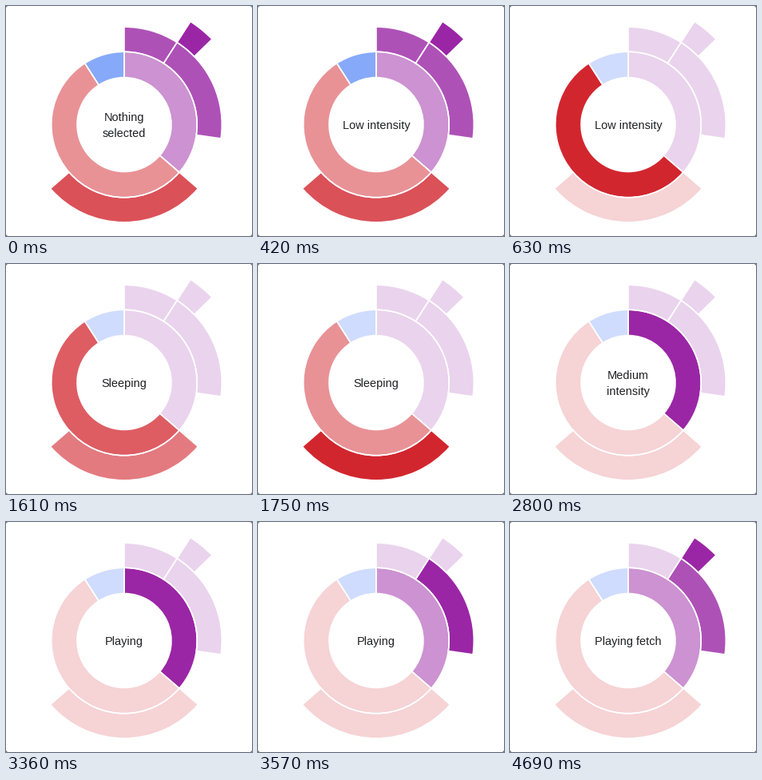
Write a matplotlib script that moves like this. It is 308x288 px and loops after 5740 ms.

```python
import numpy as np
import matplotlib.pyplot as plt
from matplotlib.animation import FuncAnimation
from matplotlib.patches import FancyBboxPatch, Wedge

W, H, DPI = 308, 288, 100
STEP, FRAMES = 70, 82
PX = 72 / DPI
CX, CY = 148, 148.5
RADII = (59.0, 91.2, 122.3, 153.4)
UNIT = 360 / 11
FADE = 200

PURPLE, RED, BLUE = "#9a26a5", "#d2262e", "#0f54f5"
LEVEL_ALPHA = (0.5, 0.8, 1.0)
DIM = 0.2

# name: (level, start, end, colour, ancestors), angles in elevenths of a turn
SEGMENTS = {
    "medium": (0, 0, 4, PURPLE, ()),
    "low": (0, 4, 10, RED, ()),
    "high": (0, 10, 11, BLUE, ()),
    "walking": (1, 0, 1, PURPLE, ("medium",)),
    "playing": (1, 1, 3, PURPLE, ("medium",)),
    "sleeping": (1, 4, 7, RED, ("low",)),
    "fetch": (2, 1, 1.4, PURPLE, ("medium", "playing")),
}

# (time in ms, selected segment, label)
EVENTS = [
    (0, None, "Nothing\nselected"),
    (420, "low", "Low intensity"),
    (1550, "sleeping", "Sleeping"),
    (2590, "medium", "Medium\nintensity"),
    (3360, "playing", "Playing"),
    (4480, "fetch", "Playing fetch"),
]


def ease(t):
    """CSS 'ease' timing curve."""
    t = min(max(t, 0), 1)
    s = np.linspace(0, 1, 201)
    a, b, c = 3 * s * (1 - s) ** 2, 3 * s ** 2 * (1 - s), s ** 3
    return np.interp(t, 0.25 * a + 0.25 * b + c, 0.1 * a + b + c)


def opacity(name, selected):
    level, *_ = SEGMENTS[name]
    if name == selected:
        return 1.0
    if selected is None or name in SEGMENTS[selected][4]:
        return LEVEL_ALPHA[level]
    return DIM


fig = plt.figure(figsize=(W / DPI, H / DPI), dpi=DPI, facecolor="#6a6a6a")
ax = fig.add_axes([0, 0, 1, 1])
ax.set(xlim=(0, W), ylim=(H, 0))
ax.axis("off")
ax.add_patch(FancyBboxPatch((0, 0), W, H, boxstyle="round,pad=0,rounding_size=3",
                            fc="white", ec="none"))

wedges = {}
for name, (level, a, b, colour, _) in SEGMENTS.items():
    inner, outer = RADII[level:level + 2]
    span = a * UNIT - 90, b * UNIT - 90
    shape = dict(width=outer - inner, joinstyle="miter")
    wedges[name] = ax.add_patch(
        Wedge((CX, CY), outer, *span, fc=colour, ec="none", **shape))
    ax.add_patch(Wedge((CX, CY), outer, *span, fc="none", ec="white",
                       lw=1.6 * PX, zorder=2, **shape))

lines = [ax.text(CX, 0, "", ha="center", va="baseline", color="#202124",
                 family="Liberation Sans", size=14.5 * PX, zorder=3)
         for _ in range(2)]


def update(frame):
    now = frame * STEP
    i = max(k for k, event in enumerate(EVENTS) if event[0] <= now)
    start, selected, label = EVENTS[i]
    previous = EVENTS[max(i - 1, 0)][1]
    p = ease((now - start) / FADE)
    for name, wedge in wedges.items():
        old, new = opacity(name, previous), opacity(name, selected)
        wedge.set_alpha(old + (new - old) * p)

    rows = label.split("\n")
    for k, line in enumerate(lines):
        line.set_text(rows[k] if k < len(rows) else "")
        line.set_y(154 + 20 * (k - (len(rows) - 1) / 2))
    return [*wedges.values(), *lines]


anim = FuncAnimation(fig, update, frames=FRAMES, interval=STEP,
                     repeat=True, repeat_delay=0, blit=False)
plt.show()
```
